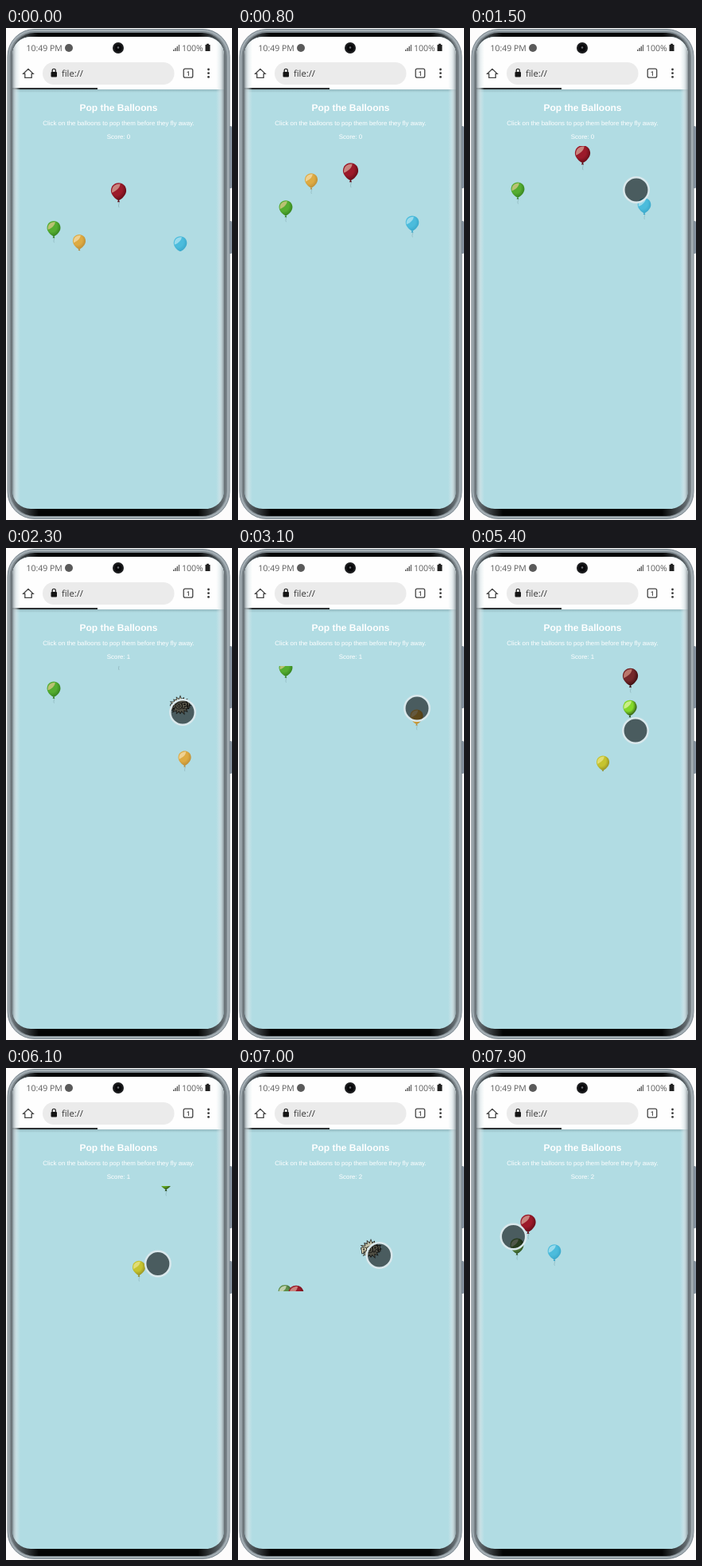
Animation, 284 px wide and 617 px high, one loop 8 s. Source, as an HTML page:

```html
<!DOCTYPE html>
<html lang="en">
<head>
<meta charset="utf-8">
<title>Pop the Balloons</title>
<style>
  html, body { margin: 0; width: 100%; height: 100%; overflow: hidden; background: #fdfcfc; }
  svg { display: block; width: 284px; height: 617px; }
  text { text-rendering: geometricPrecision; }
  .ui { font-family: "Open Sans", "Noto Sans", sans-serif; }
  .page { font-family: "Liberation Sans", Arial, sans-serif; fill: #fff; text-anchor: middle; }
</style>
</head>
<body>
<svg viewBox="0 0 284 617">
  <defs>
    <linearGradient id="bezel">
      <stop offset="0" stop-color="#70797e"/>
      <stop offset=".05" stop-color="#4a5155"/>
      <stop offset=".13" stop-color="#040404"/>
      <stop offset=".87" stop-color="#040404"/>
      <stop offset=".95" stop-color="#4a5155"/>
      <stop offset="1" stop-color="#70797e"/>
    </linearGradient>
    <linearGradient id="edge">
      <stop offset="0" stop-color="#7d888d" stop-opacity=".9"/>
      <stop offset=".25" stop-color="#b9c3c7" stop-opacity=".8"/>
      <stop offset=".5" stop-color="#d8e3e6" stop-opacity=".6"/>
      <stop offset="1" stop-color="#dcebee" stop-opacity="0"/>
    </linearGradient>
    <linearGradient id="shade" x2="0" y2="1">
      <stop offset="0" stop-color="#5c7a80" stop-opacity=".35"/>
      <stop offset="1" stop-color="#5c7a80" stop-opacity="0"/>
    </linearGradient>
    <clipPath id="screen"><rect x="8" y="11" width="266" height="592" rx="23"/></clipPath>
    <clipPath id="sky"><rect x="8" y="148" width="266" height="132"/></clipPath>
  </defs>

  <!-- phone body -->
  <g fill="#8793a0">
    <rect x="280" y="123" width="4" height="78" rx="1.5"/>
    <rect x="280" y="242" width="4" height="41" rx="1.5"/>
  </g>
  <rect x="2" y="1.500" width="279" height="614" rx="34" fill="#a3adb3" stroke="#7a868e"/>
  <rect x="4.500" y="4" width="273.500" height="609" rx="32" fill="#7e888e"/>
  <rect x="6" y="6" width="270.500" height="606" rx="30" fill="url(#bezel)"/>

  <g clip-path="url(#screen)">
    <rect x="8" y="11" width="266" height="592" fill="#b1dce3"/>
    <rect x="8" y="77" width="266" height="4" fill="url(#shade)"/>
    <rect x="8" y="11" width="266" height="66" fill="#fefefe"/>

    <!-- status bar -->
    <g class="ui" fill="#5a5a5a" font-size="10.5">
      <text x="25.500" y="28.500">10:49 PM</text>
      <text x="221" y="28.500">100%</text>
      <circle cx="79" cy="25" r="5"/>
      <path d="M210 29v-2h1.400v2zM212.300 29v-4h1.400v4zM214.600 29v-6h1.400v6zM216.900 29v-8h1.100v8z"/>
      <path d="M250.500 21h1.500v-1.300h3v1.300h1.500v8h-6z" fill="#222"/>
    </g>
    <circle cx="141" cy="25" r="7" fill="#1a1b1d"/>
    <circle cx="141" cy="25" r="4.500" fill="#08080a"/>
    <circle cx="141" cy="24.500" r="1.200" fill="#6a6d72"/>

    <!-- address bar -->
    <rect x="46" y="43" width="165.500" height="28" rx="14" fill="#ebebeb"/>
    <path d="M21.800 57.300l6.200-6 6.200 6h-2v5h-8.400v-5z" fill="none" stroke="#444" stroke-width="1.300"/>
    <rect x="56.500" y="55" width="7.500" height="6.500" rx="1" fill="#151515"/>
    <path d="M58.200 55v-1.700a2.050 2.050 0 0 1 4.100 0V55" fill="none" stroke="#151515" stroke-width="1.200"/>
    <text class="ui" x="70" y="60.600" font-size="11.200" fill="#333">file://</text>
    <rect x="223.200" y="51.200" width="11.500" height="11" rx="2" fill="none" stroke="#444" stroke-width="1.300"/>
    <text class="ui" x="229" y="59.700" font-size="8" font-weight="600" text-anchor="middle" fill="#333">1</text>
    <g fill="#3a3a3a">
      <circle cx="254.500" cy="52" r="1.400"/>
      <circle cx="254.500" cy="56.700" r="1.400"/>
      <circle cx="254.500" cy="61.400" r="1.400"/>
    </g>
    <rect x="8" y="75" width="107" height="2" fill="#2b2f31"/>

    <!-- page -->
    <g class="page">
      <text x="141.500" y="104" font-size="12" font-weight="bold">Pop the Balloons</text>
      <text x="141.500" y="122.300" font-size="7.880">Click on the balloons to pop them before they fly away.</text>
      <text id="score" x="141.500" y="139" font-size="7.900">Score: 0</text>
    </g>
    <g id="balloons" clip-path="url(#sky)"></g>

    <rect x="8" y="11" width="10" height="592" fill="url(#edge)"/>
    <rect x="8" y="11" width="10" height="592" fill="url(#edge)" transform="matrix(-1 0 0 1 282 0)"/>
  </g>

  <g id="touch" stroke="#d9e8ec" stroke-width="2.500">
    <circle r="15.700" fill="#000" fill-opacity=".58"/>
  </g>
</svg>

<script>
const LOOP = 8000;
const POP_TIME = 580;
const POPS = [1950, 6700];

// size, highlight, base, shadow
const SKINS = {
  red:    [.98, '#d9a79a', '#9c1a2a', '#5c0b15'],
  maroon: [.98, '#d39282', '#74282a', '#35090d'],
  green:  [.86, '#dcc98a', '#55ad30', '#2f7d1c'],
  lime:   [.88, '#e2f5a8', '#83d829', '#1e3f10'],
  olive:  [.86, '#dfe6cf', '#5f8f4a', '#27481c'],
  yellow: [.82, '#f4deae', '#deab42', '#b98a34'],
  lemon:  [.82, '#eae58c', '#c6c42f', '#8f8a22'],
  blue:   [.85, '#b5e6f2', '#4cbcdc', '#38a5c8']
};

// skin, x, y at time, time, rise in px per second, pop time
const FLIGHTS = [
  ['red', 141.5, 205.5, 0, 31.3],
  ['green', 60, 252, 0, 32.4],
  ['yellow', 92, 268.5, 0, 96],
  ['blue', 219, 271, 0, 32, POPS[0]],
  ['yellow', 224.5, 212, 3100, 65],
  ['blue', 29, 173, 4300, 100],
  ['maroon', 201.5, 233.5, 4300, 65],
  ['lime', 201, 201, 5400, 83],
  ['lemon', 167, 270, 5400, 26.9, POPS[1]],
  ['olive', 59, 223.5, 7900, 65],
  ['red', 73, 195, 7900, 99],
  ['blue', 106, 231, 7900, 70]
];

// time, x, y
const TOUCH = [
  [850, 262, 238], [1500, 209, 203], [1900, 219, 207], [2300, 222, 206],
  [3100, 225, 201], [3700, 226, 216], [4300, 217, 229], [5400, 208, 229],
  [6000, 192, 246], [6700, 172, 236], [7000, 177.5, 235], [7450, 96, 226],
  [7900, 54.5, 211.5], [8000, 54.5, 210]
];

const byId = id => document.getElementById(id);
const sky = byId('balloons'), score = byId('score'), touch = byId('touch');

function add(parent, tag, attrs) {
  const el = document.createElementNS('http://www.w3.org/2000/svg', tag);
  for (const key in attrs) el.setAttribute(key, attrs[key]);
  return parent.appendChild(el);
}

function drawBalloon(parent, skin, id) {
  const [size, light, base, dark] = SKINS[skin];
  const g = add(parent, 'g', { transform: `scale(${size})` });
  const grad = add(g, 'radialGradient', { id, cx: .38, cy: .35, r: .7 });
  [[0, base], [.5, base], [1, dark]].forEach(([offset, color]) =>
    add(grad, 'stop', { offset, 'stop-color': color }));
  add(g, 'path', {
    d: 'M0 12q1.200 2 .3 4t.3 4', fill: 'none',
    stroke: '#6d8f96', 'stroke-opacity': .45, 'stroke-width': .9
  });
  add(g, 'path', { d: 'M0 10l1.700 3h-3.400z', fill: dark });
  add(g, 'path', {
    d: 'M0-11.500C6-11.500 9.800-7 9.800-1.500 9.800 4 4 9.500 0 11-4 9.500-9.800 4-9.800-1.500-9.800-7-6-11.500 0-11.500z',
    fill: `url(#${id})`
  });
  add(g, 'path', {
    d: 'M-8.500 1C-9.500-6-5-10.500 2-10.200 2-5.500-3-1-8.500 1z',
    fill: light, opacity: .75
  });
  return g;
}

function drawBurst(parent) {
  const g = add(parent, 'g', {});
  const star = (scale, dip) => Array.from({ length: 32 }, (_, i) => {
    const a = i * Math.PI / 16;
    const r = (i % 2 ? dip : 1 - .07 * (i % 3)) * scale;
    return [14.5 * r * Math.cos(a), 13 * r * Math.sin(a)].map(n => n.toFixed(2));
  }).join(' ');
  add(g, 'polygon', { points: star(1, .66), fill: '#2a2b27' });
  add(g, 'polygon', { points: star(.86, .62), fill: '#c3c1a8' });
  const word = add(g, 'text', {
    y: 4, 'text-anchor': 'middle', 'font-family': 'Liberation Sans, Arial, sans-serif',
    'font-size': 10, 'font-weight': 'bold', transform: 'rotate(-8)',
    fill: '#f1ecc8', stroke: '#111', 'stroke-width': 1.6, 'paint-order': 'stroke'
  });
  word.textContent = 'POP!';
  return g;
}

const flights = FLIGHTS.map(([skin, x, y, at, rise, popAt = Infinity], i) => {
  const node = add(sky, 'g', {});
  return {
    node, x, y, at, rise, popAt,
    balloon: drawBalloon(node, skin, 'skin' + i),
    burst: popAt < LOOP ? drawBurst(node) : null
  };
});

const show = (el, on) => el.style.display = on ? '' : 'none';

function touchAt(t) {
  const i = Math.max(1, TOUCH.findIndex(k => k[0] > t));
  const [t0, x0, y0] = TOUCH[i - 1], [t1, x1, y1] = TOUCH[i];
  const u = (t - t0) / (t1 - t0), e = u * u * (3 - 2 * u);
  return [x0 + (x1 - x0) * e, y0 + (y1 - y0) * e];
}

function render(t) {
  for (const f of flights) {
    const y = f.y - f.rise * (t - f.at) / 1000;
    const popped = t >= f.popAt;
    show(f.node, y > 125 && y < 295 && t < f.popAt + POP_TIME);
    f.node.setAttribute('transform', `translate(${f.x} ${y.toFixed(2)})`);
    show(f.balloon, !popped);
    if (f.burst) show(f.burst, popped);
  }
  score.textContent = 'Score: ' + POPS.filter(p => t >= p).length;
  show(touch, t >= TOUCH[0][0]);
  touch.setAttribute('transform', `translate(${touchAt(t).join(' ')})`);
}

const start = performance.now();
function tick() {
  render((performance.now() - start) % LOOP);
  requestAnimationFrame(tick);
}
tick();
</script>
</body>
</html>
```
